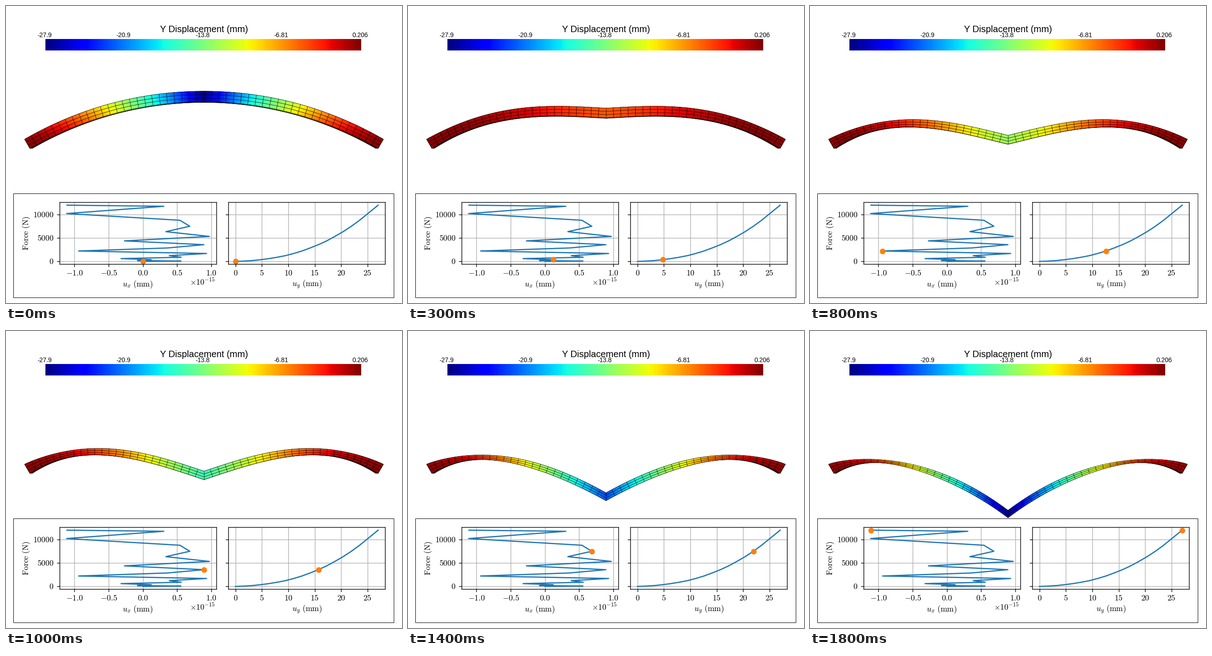
Write a matplotlib script that moves like this. It is 864x648 px and loops after 1.9 s.

```python
import numpy as np
import matplotlib.pyplot as plt
from matplotlib.animation import FuncAnimation
from matplotlib.collections import LineCollection, PolyCollection
from matplotlib.patches import Rectangle

W, H = 864, 648
STEPS = 19
PX_PER_MM = 7.35
UY_MIN, UY_MAX = -27.9, 0.206

# Arch geometry in stage pixels
CX, CY = 432, 968.9
R_TOP, R_BOT = 783, 760
HALF = np.radians(30)
CELLS, ROWS, SUB = 25, 3, 4
EYE = np.array([432, 324])
DEPTH = 0.013

force = np.array([0, 70, 185, 370, 600, 890, 1230, 1690, 2220, 2870, 3570,
                  4380, 5330, 6350, 7500, 8780, 10210, 11760, 12000])
ux = np.array([0, .555, -.08, .12, -.32, .56, .385, .93, -.94, .36, .89,
               -.27, .97, .335, .685, .54, -1.115, .305, -1.11])
uy = 1.56 * np.arange(STEPS) + 0.1
uy[0] = 0
uy[-2:] = 26.75, 27

# At 72 dpi one point is one pixel
PT = 1.75
plt.rcParams.update({
    "mathtext.fontset": "cm", "font.family": "Liberation Sans",
    "axes.linewidth": 0.8 * PT, "grid.linewidth": 0.8 * PT,
    "lines.linewidth": 1.5 * PT,
    "xtick.major.size": 3.5 * PT, "ytick.major.size": 3.5 * PT,
    "xtick.major.width": 0.8 * PT, "ytick.major.width": 0.8 * PT,
})
jet = plt.get_cmap("jet", 256)

fig = plt.figure(figsize=(W / 72, H / 72), dpi=72, facecolor="white")
stage = fig.add_axes([0, 0, 1, 1])


def label(x, y, text, size=10 * PT, ha="center", **kw):
    stage.text(x, y, text, size=size, ha=ha, va="baseline", zorder=8, **kw)


def sink(v, w, load):
    """Downward shift in pixels; v: centre 0 to end 1, w: top 0 to bottom 1."""
    a = load / 27
    rest = 1 - v
    smooth = rest**3 * (1 + 3 * v)
    kinked = rest**(1.5 - 0.28 * v)
    shape = smooth + np.sqrt(a) * (kinked - smooth)
    squeeze = 7 * rest + 12.4 * np.sin(np.pi * v**2.4)
    thin = a**0.8
    return (PX_PER_MM * load + 7 * thin) * shape - w * thin * squeeze


def edge(radius, d, w, load):
    """Height of the top or bottom edge at distance d from the middle."""
    v = np.minimum(np.arcsin(np.minimum(d / radius, 1)) / HALF, 1)
    return CY - np.sqrt(radius**2 - d**2) + sink(v, w, load)


def mirror(half, sign=1):
    return np.concatenate([sign * half[:, ::-1], half[:, 1:]], axis=1)


theta = np.linspace(0, HALF, CELLS * SUB + 1)
level = np.linspace(0, 1, ROWS + 1)[:, None]


def mesh(load):
    d = (R_TOP + R_BOT) / 2 * np.sin(theta)
    top, bot = edge(R_TOP, d, 0, load), edge(R_BOT, d, 1, load)
    slope = np.gradient((top + bot) / 2, d)
    lean = 0.5 * (bot - top) * slope / (1 + slope**2)
    lean *= np.minimum(1, np.arange(len(d)) / SUB)
    lean[-1] = (R_TOP - R_BOT) / 2 * np.sin(HALF)
    d_top, d_bot = np.maximum(d + lean, 0), np.maximum(d - lean, 0)
    y_top, y_bot = edge(R_TOP, d_top, 0, load), edge(R_BOT, d_bot, 1, load)
    x = CX + mirror(d_top + level * (d_bot - d_top), -1)
    y = mirror(y_top + level * (y_bot - y_top))
    return np.stack([x, y], axis=-1)


def quads(p):
    corners = [p[:-1, :-1], p[:-1, 1:], p[1:, 1:], p[1:, :-1]]
    return np.stack(corners, axis=2).reshape(-1, 4, 2)


def cell_colors(load):
    u = -mirror(sink(theta / HALF, level, load)) / PX_PER_MM
    mean = (u[:-1, :-1] + u[:-1, 1:] + u[1:, 1:] + u[1:, :-1]) / 4
    return jet((mean - UY_MIN) / (UY_MAX - UY_MIN))


# Colour bar
bands = np.linspace(0, 1, 128)[None, :]
stage.pcolormesh(np.linspace(86, 775, 129), [72, 97], bands, cmap=jet)
label(432, 57.2, "Y Displacement (mm)", size=20)
for i, text in enumerate(["-27.9", "-20.9", "-13.8", "-6.81", "0.206"]):
    label(84.5 + 172 * i, 68.5, text, size=13.8)

# Beam
under = stage.add_collection(PolyCollection([], linewidths=0.5, zorder=2))
under_line = stage.add_collection(
    LineCollection([], colors="black", linewidths=0.75, zorder=2.5))
faces = stage.add_collection(PolyCollection([], linewidths=0.5, zorder=3))
face_lines = stage.add_collection(
    LineCollection([], colors="black", linewidths=0.75, zorder=4))

# Plot panel
stage.add_patch(Rectangle((16.2, 408.8), 830, 227, fc="white", ec="black",
                          lw=1, zorder=1))
stage.set(xlim=(0, W), ylim=(H, 0))
stage.axis("off")


def plot_axes(left, right, data, xticks):
    top, bottom = 428.4, 563.4
    ax = fig.add_axes([left / W, 1 - bottom / H, (right - left) / W,
                       (bottom - top) / H])
    ax.plot(data, force, color="C0")
    dot, = ax.plot([], [], "o", color="C1", ms=6 * PT, mew=PT)
    ax.set_xticks(xticks, labels=[])
    ax.set_yticks([0, 5000, 10000], labels=[])
    ax.grid(True)
    ax.set_xlim(ax.get_xlim())
    ax.set_ylim(ax.get_ylim())

    def to_px(x):
        lo, hi = ax.get_xlim()
        return left + (x - lo) / (hi - lo) * (right - left)
    return dot, to_px


x_ticks = [-1, -0.5, 0, 0.5, 1]
y_ticks = range(0, 26, 5)
dot_x, px_x = plot_axes(116.7, 459.2, ux, x_ticks)
dot_y, px_y = plot_axes(485.1, 827.4, uy, y_ticks)

for t in x_ticks:
    sign = "{-}" if t < 0 else ""
    label(px_x(t), 588.5, f"${sign}{abs(t):.1f}$")
for t in y_ticks:
    label(px_y(t), 588.5, f"${t}$")
for i, t in enumerate([0, 5000, 10000]):
    label(104.3, 563.2 - 51.1 * i, f"${t}$", ha="right")
label(287.5, 612, r"$u_x\ \mathrm{(mm)}$")
label(656.5, 612, r"$u_y\ \mathrm{(mm)}$")
label(456, 608.4, r"${\times}10^{-15}$", ha="right")
label(49, 496, r"$\mathrm{Force\ (N)}$", rotation=90, rotation_mode="anchor")


def update(k):
    p = mesh(uy[k])
    # The unloaded arch is coloured with the final displacement
    colors = cell_colors(uy[k] if k else uy[-1])
    flat = colors.reshape(-1, 4)
    faces.set_verts(quads(p))
    faces.set_facecolor(flat)
    faces.set_edgecolor(flat)
    face_lines.set_segments(list(p) + list(p[:, ::SUB].swapaxes(0, 1)))

    # Dark underside, seen in slight perspective
    front = p[-1]
    back = front + (EYE - front) * DEPTH
    shade = colors[-1] * [0.35, 0.35, 0.35, 1]
    under.set_verts(quads(np.stack([front, back])))
    under.set_facecolor(shade)
    under.set_edgecolor(shade)
    under_line.set_segments([back])

    dot_x.set_data([ux[k]], [force[k]])
    dot_y.set_data([uy[k]], [force[k]])
    return faces, face_lines, under, under_line, dot_x, dot_y


anim = FuncAnimation(fig, update, frames=STEPS, interval=100, repeat=True)
plt.show()
```
